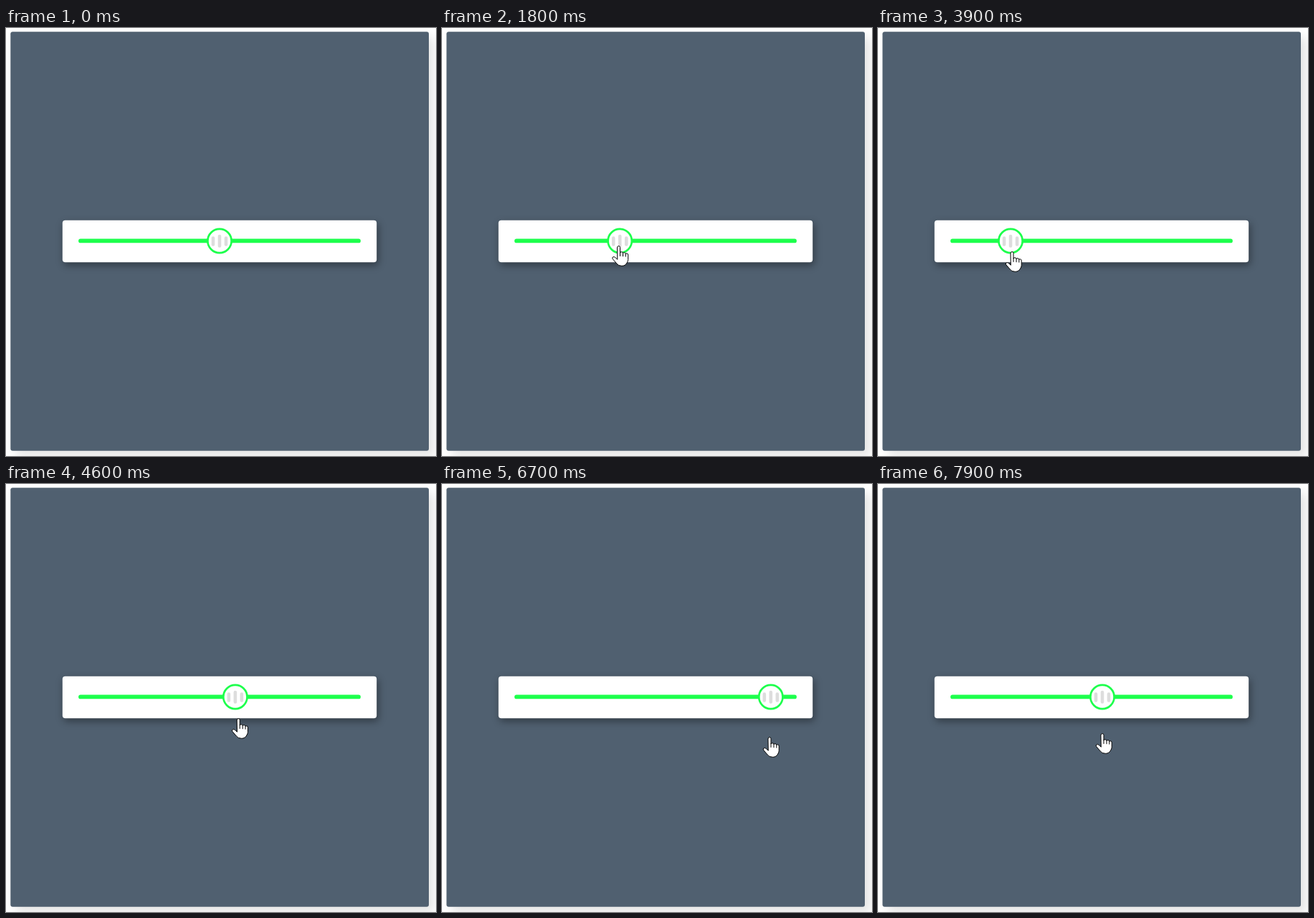
An HTML page that plays this animation: 600x596 px, repeating every 8000 ms.

```html
<!DOCTYPE html>
<html lang="en">
<head>
<meta charset="utf-8">
<title>Range slider</title>
<style>
  html, body { margin: 0; width: 100%; height: 100%; overflow: hidden; background: #fff; }
  svg { display: block; }
  .panel { fill: #506070; filter: drop-shadow(8px 8px 7px rgba(0, 0, 0, .1)); }
  .card { fill: #fff; filter: drop-shadow(2px 4px 5.5px rgba(0, 0, 0, .4)); }
  .green { stroke: #1dff4c; }
  .grip { stroke: #ddd; stroke-width: 4.6; stroke-linecap: round; }
  .cursor { fill: #fff; stroke: #000; stroke-width: 1; stroke-linejoin: round; stroke-linecap: round; }
</style>
</head>
<body>
<svg width="600" height="596" viewBox="0 0 600 596">
  <rect class="panel" x="6.3" y="5.3" width="583.7" height="583.5" rx="3"/>
  <rect class="card" x="78.8" y="267.8" width="438.4" height="58.4" rx="4"/>
  <path class="green" d="M104 296.4H492" stroke-width="5.8" stroke-linecap="round"/>
  <g id="thumb">
    <circle class="green" r="16.6" fill="#fff" stroke-width="2.7"/>
    <path class="grip" d="M-9-4V5M0-6.5V7M9-4V5"/>
  </g>
  <g id="cursor" class="cursor">
    <path id="arrow" d="M0 0V16.5L3.8 12.9L6.3 18.6L8.9 17.5L6.4 11.9H11.7Z"/>
    <g id="hand">
      <path d="M-2 2.6Q-1.8.6 0 .6Q1.9.6 2 2.6V10Q2.4 8.8 4 8.8Q5.8 8.8 6 10.6Q6.5 9.6 8 9.7Q9.6 9.8 9.8 11.6Q10.3 10.7 11.6 10.9Q13.2 11.1 13.2 13V19.5Q13 22 11.6 24Q9.4 28.3 4.4 28.3Q-.4 28.4-2.8 25L-8.3 18.6Q-9.4 16.8-7.9 15.8Q-6.2 15.1-4.6 16.6L-2 19Z"/>
      <path d="M2 9.8V14.5M6 10.6V14.8M9.8 11.6V15.2" fill="none"/>
    </g>
  </g>
</svg>
<script>
  const LOOP = 8000, STEP = 100;
  const ENTER = 100, GRAB = 1250, LAG = 18;
  const REST_X = 298, MIN_X = 119, MAX_X = 477;

  // Turning points of the pointer: time, x, y
  const path = [
    [ENTER, 588, 140], [900, 279, 290], [1150, 292, 299], [1800, 246.5, 303],
    [2700, 112, 306], [2900, 112, 306], [3900, 187, 311], [5200, 454, 342],
    [5600, 507, 349], [6100, 507, 349], [6700, 457, 352], [7850, 313, 347]
  ];

  const clamp = (v, lo, hi) => Math.min(hi, Math.max(lo, v));
  const last = path.length - 1;

  function slope(i, axis) {
    const a = path[i], b = path[i + 1];
    return (b[axis] - a[axis]) / (b[0] - a[0]);
  }

  // Harmonic mean of the neighbouring slopes keeps the curve free of overshoot
  function tangent(i, axis) {
    const before = slope(Math.max(i - 1, 0), axis);
    const after = slope(Math.min(i, last - 1), axis);
    return before * after > 0 ? 2 * before * after / (before + after) : 0;
  }

  function pointer(time, axis) {
    const t = clamp(time, path[0][0], path[last][0]);
    const i = Math.max(path.findIndex(k => k[0] >= t) - 1, 0);
    const a = path[i], b = path[i + 1], span = b[0] - a[0];
    const p = (t - a[0]) / span, q = 1 - p;
    return q * q * (1 + 2 * p) * a[axis] + p * p * (1 + 2 * q) * b[axis]
      + span * p * q * (q * tangent(i, axis) - p * tangent(i + 1, axis));
  }

  const byId = id => document.getElementById(id);
  const [thumb, cursor, arrow, hand] = ['thumb', 'cursor', 'arrow', 'hand'].map(byId);
  const show = (el, on) => el.setAttribute('visibility', on ? 'visible' : 'hidden');
  const move = (el, x, y) => el.setAttribute('transform', `translate(${x} ${y})`);

  function draw(now) {
    const t = Math.floor(now % LOOP / STEP) * STEP;
    const x = pointer(t, 1), y = pointer(t, 2);
    const thumbX = t < GRAB ? REST_X : clamp(pointer(t - LAG, 1), MIN_X, MAX_X);
    move(thumb, thumbX, 296.5);
    move(cursor, x, y);
    const entered = t >= ENTER, overSlider = y > 278;
    show(arrow, entered && !overSlider);
    show(hand, entered && overSlider);
  }

  const start = performance.now();
  function tick() {
    draw(performance.now() - start);
    requestAnimationFrame(tick);
  }
  tick();
</script>
</body>
</html>
```
